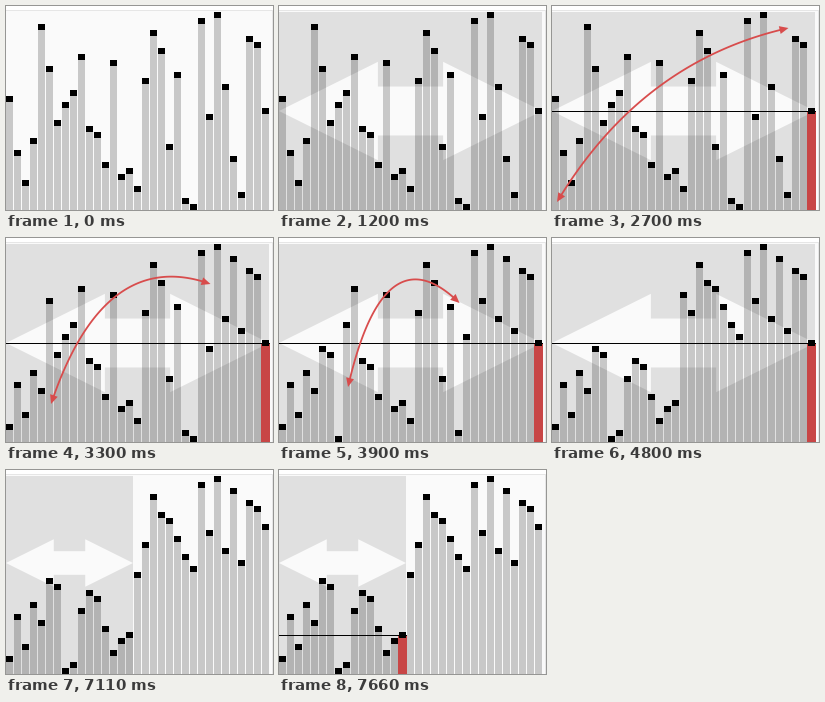
Animation, 267 px wide and 204 px high, one loop 8000 ms. Source, as a matplotlib script:

```python
import numpy as np
import matplotlib.pyplot as plt
from matplotlib.animation import FuncAnimation
from matplotlib.collections import PolyCollection
from matplotlib.patches import PathPatch, Rectangle
from matplotlib.path import Path

W, H, DPI = 267, 204, 100
LOOP, STEP = 8000, 20
PITCH, UNIT = 8, 6
PX = 72 / DPI
RED, BAR_RED = "#d84c4c", "#c84646"

START = [19, 10, 5, 12, 31, 24, 15, 18, 20, 26, 14, 13, 8, 25, 6, 7, 4,
         22, 30, 27, 11, 23, 2, 1, 32, 16, 33, 21, 9, 3, 29, 28, 17]
N = len(START)

# swap arcs: y of left tip, y of right tip, control point
ARCS = [(196, 22, 89.5, 55), (172, 31, 95, 27), (166, 46, 98, 8),
        (157, 59, 102, -3), (149, 65, 105, -9), (139, 73, 108, -9),
        (118, 101, 118, 72)]
LAST_ARC = (52, 100, 196, -70)


def rect(x0, y0, x1, y1):
    return [(x0, y0), (x0, y1), (x1, y1), (x1, y0)]


def partition_swaps(a):
    """Index pairs exchanged while partitioning around the last value."""
    a, pivot = list(a), a[-1]
    i, j = 0, len(a) - 2
    while True:
        while a[i] < pivot:
            i += 1
        while a[j] > pivot:
            j -= 1
        if i >= j:
            return
        a[i], a[j] = a[j], a[i]
        yield i, j


def swapped(a, i, j):
    b = list(a)
    b[i], b[j] = b[j], b[i]
    return b


def arc_points(i, j, arc):
    y0, y1, cx, cy = arc
    p0 = np.array([PITCH * i + 5, y0])
    p1 = np.array([PITCH * j + 4.5, y1])
    t = np.linspace(0, 1, 120)[:, None]
    return (1 - t) ** 2 * p0 + 2 * t * (1 - t) * np.array([cx, cy]) + t ** 2 * p1


def build_states():
    """List of (time, values, highlighted bars, pivot index, arc)."""
    a = list(START)
    states = [(0, a, 0, None, None), (1200, a, N, None, None),
              (1950, a, N, N - 1, None)]
    pairs = list(partition_swaps(a))
    for k, (i, j) in enumerate(pairs):
        last = k == len(pairs) - 1
        if last:
            a = swapped(a, i, j)
        states.append((2700 + 300 * k, a, N, N - 1, arc_points(i, j, ARCS[k])))
        if not last:
            a = swapped(a, i, j)
    mid = START[-1] - 1
    states += [(4800, a, N, N - 1, None),
               (5510, a, N, N - 1, arc_points(mid, N - 1, LAST_ARC))]
    a = swapped(a, mid, N - 1)
    states += [(6110, a, N, mid, None), (7110, a, mid, None, None),
               (7660, a, mid, mid - 1, None)]
    return states


def shade_path(n):
    """Shaded block over n bars with a double arrow cut out."""
    w = PITCH * n - 1
    c = 105 if n == N else 93
    head, half, shaft = 0.376 * w, 0.187 * w, 0.093 * w
    arrow = [(0, c), (head, c - half), (head, c - shaft), (w - head, c - shaft),
             (w - head, c - half), (w, c), (w - head, c + half),
             (w - head, c + shaft), (head, c + shaft), (head, c + half)]
    verts, codes = [], []
    for ring in (rect(0, 6, w, H), arrow):
        verts += ring + [ring[0]]
        codes += [Path.MOVETO] + [Path.LINETO] * (len(ring) - 1) + [Path.CLOSEPOLY]
    return Path(verts, codes)


def arrow_head(pts, length=9, half=4):
    """Triangle at the first point of a curve."""
    tip = pts[0]
    near = pts[np.argmax(np.hypot(*(pts - tip).T) > length * 0.8)]
    d = (near - tip) / np.hypot(*(near - tip))
    side = np.array([-d[1], d[0]]) * half
    return [tip, tip + d * length + side, tip + d * length - side]


fig = plt.figure(figsize=(W / DPI, H / DPI), dpi=DPI, facecolor="white")
ax = fig.add_axes([0, 0, 1, 1])
ax.set(xlim=(0, W), ylim=(H, 0))
ax.axis("off")

ax.add_patch(Rectangle((-5, 3.5), 270.5, 220, fc="#fafafa", ec="#e6e6e6", lw=PX))


def polys(color, z):
    return ax.add_collection(PolyCollection([], facecolors=color, linewidths=0, zorder=z),
                             autolim=False)


bars = polys("#c8c8c8", 1)
shade = ax.add_patch(PathPatch(shade_path(N), fc="black", alpha=0.1, lw=0, zorder=2))
pivot_bar = polys(BAR_RED, 3)
pivot_line = polys("black", 4)
caps = polys("black", 5)
heads = polys(RED, 7)
curve, = ax.plot([], [], color=RED, lw=1.8 * PX, solid_capstyle="butt", zorder=6)

STATES = build_states()
SHADES = {n: shade_path(n) for n in {s[2] for s in STATES} if n}


def update(k):
    t = k * STEP + 10
    _, values, lit, pivot, arc = [s for s in STATES if s[0] <= t][-1]

    tops = [H - UNIT * v for v in values]
    bars.set_verts([rect(PITCH * i, y, PITCH * i + 7, H) for i, y in enumerate(tops)])
    caps.set_verts([rect(PITCH * i, y, PITCH * i + 7, y + UNIT) for i, y in enumerate(tops)])

    shade.set_visible(lit > 0)
    if lit:
        shade.set_path(SHADES[lit]) if hasattr(shade, "set_path") else None

    if pivot is None:
        pivot_bar.set_verts([])
        pivot_line.set_verts([])
    else:
        x, y = PITCH * pivot, tops[pivot] + 3
        pivot_bar.set_verts([rect(x - 0.6, y, x + 7.6, H)])
        pivot_line.set_verts([rect(0, y, PITCH * lit, y + 1)])

    if arc is None:
        curve.set_data([], [])
        heads.set_verts([])
    else:
        far = [np.hypot(*(arc - end).T) > 6 for end in (arc[0], arc[-1])]
        curve.set_data(*arc[far[0] & far[1]].T)
        heads.set_verts([arrow_head(arc), arrow_head(arc[::-1])])
    return bars, shade, pivot_bar, pivot_line, caps, curve, heads


anim = FuncAnimation(fig, update, frames=LOOP // STEP, interval=STEP,
                     repeat=True, repeat_delay=0, blit=False)
plt.show()
```
